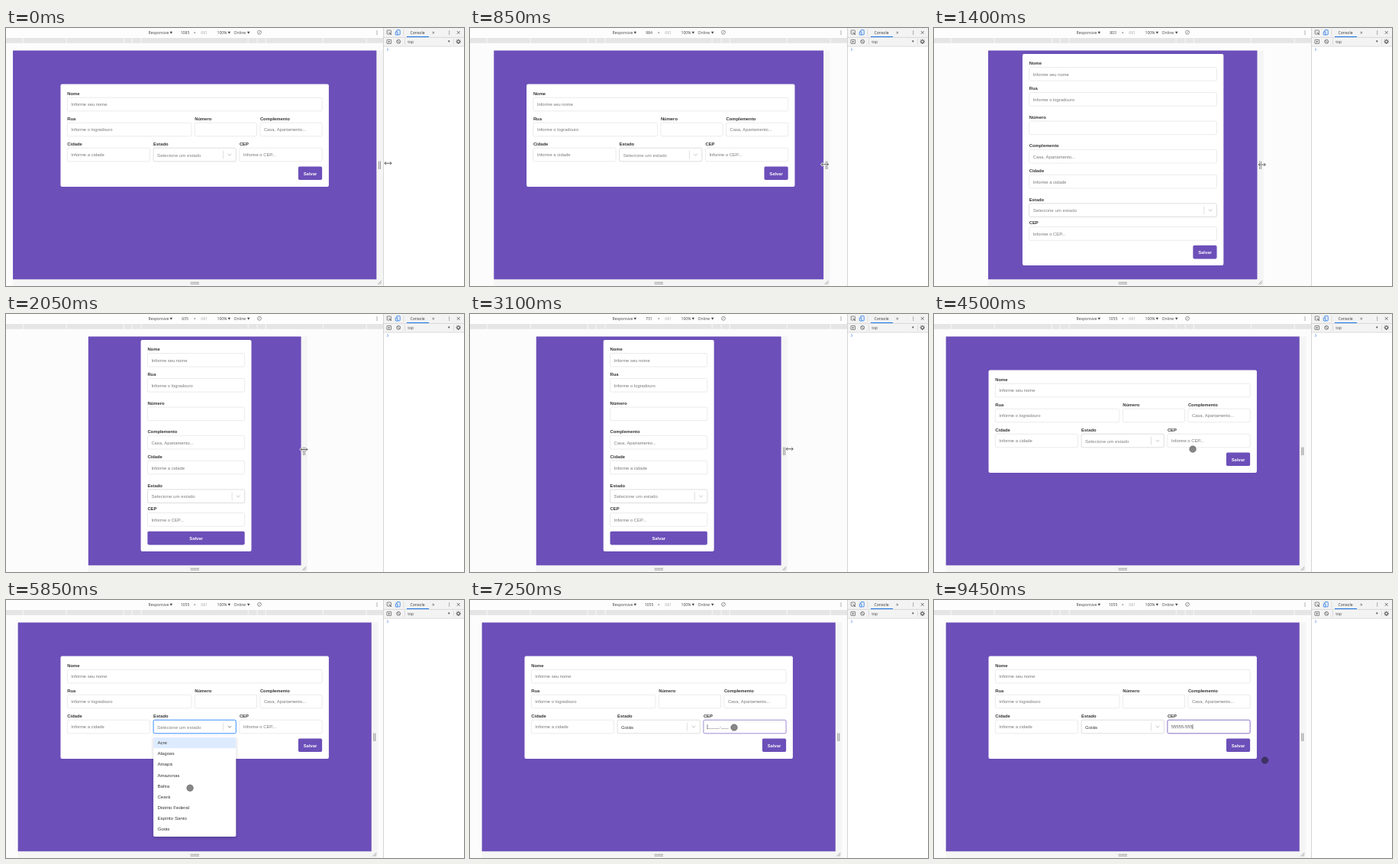
An HTML page with a canvas for the animation above (9.5 s loop, 600 px wide and 338 px high).

```html
<!DOCTYPE html>
<html lang="pt-BR">
<head>
<meta charset="utf-8">
<title>Formulário responsivo</title>
<style>
html, body { margin: 0; width: 100%; height: 100%; overflow: hidden; background: #fff; }
canvas { display: block; width: 600px; height: 338px; }
</style>
</head>
<body>
<canvas id="stage"></canvas>
<script>
const canvas = document.getElementById('stage');
const ctx = canvas.getContext('2d');
const dpr = window.devicePixelRatio || 1;
canvas.width = 600 * dpr;
canvas.height = 338 * dpr;

const LOOP = 9500, STEP = 50;
const SCALE = 0.439, CENTER = 247.2;
const PURPLE = '#6c4fb9';
const UI = '"Open Sans", "Noto Sans", sans-serif';
const ARIAL = '"Liberation Sans", Arial, sans-serif';

// [time, viewport width]
const WIDTHS = [[500, 1085], [650, 1062], [1000, 925], [1320, 808], [1400, 803], [1460, 800],
  [2050, 635], [2350, 562], [2420, 562], [3000, 706], [3100, 731], [4000, 1007], [4200, 1055]];
// [time, x, y]
const TOUCH = [[4250, 478, 179], [4500, 339, 177], [4800, 285, 169], [5150, 266, 168], [5450, 262, 170],
  [6100, 228, 294], [6300, 223, 300], [6600, 223, 299], [7050, 346, 167], [8850, 346, 167], [9300, 432, 214], [9450, 433.5, 210]];
const OPEN = 5250, PICK = 6500, FOCUS = 7100, TYPE = 7900, KEY_GAP = 105;
const STATES = ['Acre', 'Alagoas', 'Amapá', 'Amazonas', 'Bahia', 'Ceará',
  'Distrito Federal', 'Espírito Santo', 'Goiás', 'Maranhão'];

function sample(keys, t, col = 1) {
  if (t <= keys[0][0]) return keys[0][col];
  for (let i = 1; i < keys.length; i++) {
    const a = keys[i - 1], b = keys[i];
    if (t <= b[0]) return a[col] + (b[col] - a[col]) * (t - a[0]) / (b[0] - a[0]);
  }
  return keys[keys.length - 1][col];
}

const viewport = t => sample(WIDTHS, t);
const rightEdge = t => CENTER + viewport(t) * SCALE / 2;

function rect(x, y, w, h, fill) {
  ctx.fillStyle = fill;
  ctx.fillRect(x, y, w, h);
}

function box(x, y, w, h, r, fill, stroke, lw = 0.6) {
  ctx.beginPath();
  ctx.roundRect(x, y, w, h, r);
  if (fill) { ctx.fillStyle = fill; ctx.fill(); }
  if (stroke) { ctx.strokeStyle = stroke; ctx.lineWidth = lw; ctx.stroke(); }
}

function line(points, color, lw = 0.6) {
  ctx.beginPath();
  points.forEach(([x, y]) => ctx.lineTo(x, y));
  ctx.strokeStyle = color;
  ctx.lineWidth = lw;
  ctx.stroke();
}

function circle(x, y, r, fill, stroke, lw = 0.7) {
  ctx.beginPath();
  ctx.arc(x, y, r, 0, Math.PI * 2);
  if (fill) { ctx.fillStyle = fill; ctx.fill(); }
  if (stroke) { ctx.strokeStyle = stroke; ctx.lineWidth = lw; ctx.stroke(); }
}

function triangle(x, y, r, color) {
  ctx.beginPath();
  ctx.moveTo(x - r, y - r * 0.8);
  ctx.lineTo(x + r, y - r * 0.8);
  ctx.lineTo(x, y + r);
  ctx.fillStyle = color;
  ctx.fill();
}

function text(str, x, y, size, color, { bold = false, font = ARIAL, align = 'left' } = {}) {
  ctx.font = `${bold ? 'bold ' : ''}${size}px ${font}`;
  ctx.textAlign = align;
  ctx.fillStyle = color;
  ctx.fillText(str, x, y + size * 0.36);
}

const uiText = (str, x, y, color = '#444', align = 'left') =>
  text(str, x, y, 5.1, color, { font: UI, align });

function dots(x, y) {
  for (const d of [-2, 0, 2]) circle(x, y + d, 0.6, '#555');
}

function drawToolbar(t) {
  rect(0, 0, 494, 12.5, '#fdfdfd');
  uiText('Responsive', 186.5, 6);
  triangle(216.3, 6, 1.7, '#444');
  uiText(String(Math.round(viewport(t))), 234.5, 6, '#444', 'center');
  uiText('×', 247.3, 6.5, '#666', 'center');
  uiText('681', 259.6, 6, '#aaa', 'center');
  uiText('100%', 276.5, 6);
  triangle(292.3, 6, 1.7, '#444');
  uiText('Online', 298.5, 6);
  triangle(317.7, 6, 1.7, '#444');
  circle(332, 5.8, 2.5, null, '#777');
  line([[330.4, 7], [333.6, 4.5]], '#777');
  dots(486, 6);

  rect(0, 13, 494, 6.8, '#e5e5e5');
  for (const d of [70, 82, 93, 168, 225])
    for (const side of [-1, 1]) rect(CENTER + side * d - 0.5, 13, 1, 6.8, '#f8f8f8');
}

function drawDevTools() {
  rect(494, 0, 106, 338, '#fff');
  rect(494, 0, 106, 24, '#f3f3f3');
  rect(494, 0, 0.8, 338, '#ccc');
  rect(494, 11.9, 106, 0.7, '#ccc');
  rect(494, 23.7, 106, 0.7, '#ccc');

  box(499.2, 3, 5.2, 5, 0.6, null, '#666', 0.8);
  line([[504.8, 8.8], [501.7, 5.5]], '#555', 1);
  box(511.8, 2.6, 4.4, 6.2, 0.6, null, '#1a73e8', 0.8);
  box(510.3, 5, 2.6, 4, 0.4, '#f3f3f3', '#1a73e8', 0.8);
  rect(520.7, 2, 0.6, 8, '#ccc');
  uiText('Console', 539, 6, '#333', 'center');
  rect(525, 11, 29, 1, '#1a73e8');
  text('»', 559.7, 5.4, 7, '#555', { font: UI, align: 'center' });
  dots(580.7, 6);
  line([[590.8, 4], [594.6, 7.8]], '#555', 0.8);
  line([[594.6, 4], [590.8, 7.8]], '#555', 0.8);

  box(499, 15.4, 5.6, 5, 0.4, null, '#666', 0.8);
  ctx.save();
  ctx.translate(502, 18);
  ctx.rotate(-Math.PI / 2);
  triangle(0, 0, 1.3, '#555');
  ctx.restore();
  circle(514.2, 17.8, 2.4, null, '#555', 0.8);
  line([[512.6, 16.2], [515.8, 19.4]], '#555', 0.8);
  rect(522, 14, 0.6, 8, '#ccc');
  uiText('top', 526.2, 18);
  triangle(580.3, 17.6, 1.3, '#444');
  rect(586, 14, 0.6, 8, '#ccc');
  for (let i = 0; i < 8; i++) {
    const a = i * Math.PI / 4;
    line([[592.7 + 2 * Math.cos(a), 17.8 + 2 * Math.sin(a)], [592.7 + 3.2 * Math.cos(a), 17.8 + 3.2 * Math.sin(a)]], '#555', 1);
  }
  circle(592.7, 17.8, 1.8, null, '#555', 1.1);
  line([[499.2, 26.6], [500.8, 28.2], [499.2, 29.8]], '#3b7de8', 0.8);
}

function drawViewport(t) {
  const half = viewport(t) * SCALE / 2;
  const left = CENTER - half, right = CENTER + half;
  rect(0, 19.8, 494, 318.2, '#fcfcfc');
  rect(right, 29.5, 8.5, 308.5, '#f5f5f5');
  rect(left, 329.3, right - left + 8.5, 8.7, '#f5f5f5');
  rect(left, 29.5, right - left, 299.8, PURPLE);
  for (const d of [3, 5]) rect(right + d - 0.4, 174.5, 0.9, 10.5, '#888');
  for (const d of [0, 2]) rect(241.5, 332.8 + d, 11.5, 0.9, '#999');
  line([[right + 1.8, 335.8], [right + 6.4, 331.2]], '#777', 0.7);
  line([[right + 4.2, 335.8], [right + 6.4, 333.6]], '#777', 0.7);
}

// Rows hold [label, hint, x, width, centre y]
function formLayout(width) {
  if (width >= 1024 || width > 900) {
    return {
      w: 351.4, top: 73.5, bottom: 208, buttonY: 190.2, buttonW: 31.2,
      fields: [
        ['Nome', 'Informe seu nome', 0, 333.8, 100],
        ['Rua', 'Informe o logradouro', 0, 162.6, 133],
        ['Número', '', 167, 81.2, 133],
        ['Complemento', 'Casa, Apartamento...', 252.6, 81.2, 133],
        ['Cidade', 'Informe a cidade', 0, 108.2, 166],
        ['Estado', 'Selecione um estado', 112.8, 108.2, 166],
        ['CEP', 'Informe o CEP...', 225.6, 108.2, 166]
      ]
    };
  }
  const w = width >= 768 ? 263.4 : 144.9, inner = w - 17.6;
  return {
    w, top: 34, bottom: 311, buttonY: 293.6, buttonW: width >= 768 ? 31.2 : inner,
    fields: [
      ['Nome', 'Informe seu nome', 0, inner, 60.3],
      ['Rua', 'Informe o logradouro', 0, inner, 93.3],
      ['Número', '', 0, inner, 130.8],
      ['Complemento', 'Casa, Apartamento...', 0, inner, 168.2],
      ['Cidade', 'Informe a cidade', 0, inner, 201.1],
      ['Estado', 'Selecione um estado', 0, inner, 238.7],
      ['CEP', 'Informe o CEP...', 0, inner, 269.4]
    ]
  };
}

function drawSelect(x, y, w, hint, t) {
  const active = t >= OPEN && t < FOCUS;
  box(x, y - 8.8, w, 17.6, 1.8, '#fff', active ? '#2684ff' : '#c8c8c8', active ? 0.9 : 0.6);
  const picked = t >= PICK;
  text(picked ? 'Goiás' : hint, x + 5, y + 0.3, 6.15, picked ? '#333' : '#808080');
  const r = x + w;
  rect(r - 16.9, y - 5.3, 0.6, 10.6, '#ccc');
  line([[r - 10.7, y - 1], [r - 8.4, y + 1.2], [r - 6.1, y - 1]], active ? '#777' : '#bbb', 0.9);
}

function drawCep(x, y, w, hint, t) {
  if (t < FOCUS) {
    box(x, y - 8.8, w, 17.6, 1.8, '#fff', '#ddd');
    text(hint, x + 5, y + 0.3, 5.85, '#777');
    return;
  }
  ctx.globalAlpha = Math.min(1, 0.6 + (t - FOCUS) / 700);
  box(x, y - 8.8, w, 17.6, 1.8, '#fff', PURPLE, 0.8);
  ctx.globalAlpha = 1;
  const typed = Math.max(0, Math.min(8, Math.floor((t - TYPE) / KEY_GAP) + 1));
  const digits = '5'.repeat(typed).padEnd(8, '_');
  const value = digits.slice(0, 5) + '-' + digits.slice(5);
  text(value, x + 4.8, y + 0.3, 5.85, '#555');
  const before = value.slice(0, typed < 5 ? typed : typed + 1);
  const blinkFrom = typed ? TYPE + typed * KEY_GAP : FOCUS;
  if (t < blinkFrom || Math.floor((t - blinkFrom) / 500) % 2 === 0 || t >= 9350) {
    rect(x + 4.8 + ctx.measureText(before).width, y - 3.1, 0.6, 6.4, '#333');
  }
}

function drawMenu(x, y, w, t) {
  if (t < OPEN || t >= PICK) return;
  const h = 131.7, row = 14.05;
  ctx.save();
  ctx.shadowColor = 'rgba(0,0,0,.2)';
  ctx.shadowBlur = 4 * dpr;
  ctx.shadowOffsetY = 1.5 * dpr;
  box(x, y, w, h, 1.8, '#fff');
  ctx.restore();
  ctx.save();
  ctx.beginPath();
  ctx.rect(x, y, w, h);
  ctx.clip();
  const focused = t >= 6350 ? 8 : 0;
  STATES.forEach((name, i) => {
    const top = y + 1.75 + i * row;
    if (i === focused) rect(x, top, w, row, '#deebff');
    text(name, x + 5.3, top + row / 2, 6.15, '#333');
  });
  ctx.restore();
}

function drawForm(t) {
  const width = viewport(t);
  const lag = Math.max(0, viewport(t - 30) - width) * SCALE / 2;
  const form = formLayout(width);
  const left = CENTER + lag - form.w / 2;
  const inner = left + 8.8;
  box(left, form.top, form.w, form.bottom - form.top, 2, '#fff');
  let menu;
  for (const [label, hint, dx, w, y] of form.fields) {
    const x = inner + dx;
    text(label, x, y - 14.2, 5.85, '#333', { bold: true });
    if (label === 'Estado') {
      drawSelect(x, y, w, hint, t);
      menu = [x, y + 12.4, w];
    } else if (label === 'CEP') {
      drawCep(x, y, w, hint, t);
    } else {
      box(x, y - 8.8, w, 17.6, 1.8, '#fff', '#ddd');
      text(hint, x + 5, y + 0.3, 5.85, '#777');
    }
  }
  const bx = left + form.w - 8.8 - form.buttonW;
  box(bx, form.buttonY - 8.8, form.buttonW, 17.6, 1.8, PURPLE);
  text('Salvar', bx + form.buttonW / 2, form.buttonY + 0.2, 5.85, '#fff', { bold: true, align: 'center' });
  drawMenu(...menu, t);
}

function drawPointer(t) {
  if (t >= 4250) {
    circle(sample(TOUCH, t, 1), sample(TOUCH, t, 2), 4.3, 'rgba(25,25,25,.52)', 'rgba(25,25,25,.4)', 0.8);
    return;
  }
  const x = t < 400 ? 500.5 - 8 * t / 400 : rightEdge(t + 60) + 7;
  const y = sample([[0, 177.2], [500, 178.5], [1400, 179], [2050, 177.5], [3100, 176.8], [4250, 179]], t);
  const arrow = (color, lw) => {
    line([[x - 4.3, y], [x + 4.3, y]], color, lw);
    for (const s of [-1, 1]) line([[x + s * 2.6, y - 2], [x + s * 4.6, y], [x + s * 2.6, y + 2]], color, lw);
  };
  arrow('#fff', 2);
  arrow('#333', 0.8);
}

function frame(now) {
  const t = Math.floor((now % LOOP) / STEP) * STEP;
  ctx.setTransform(dpr, 0, 0, dpr, 0, 0);
  rect(0, 0, 600, 338, '#fff');
  drawViewport(t);
  drawForm(t);
  drawToolbar(t);
  drawDevTools();
  drawPointer(t);
  requestAnimationFrame(() => frame(performance.now() - start));
}

const start = performance.now();
frame(0);
</script>
</body>
</html>
```
